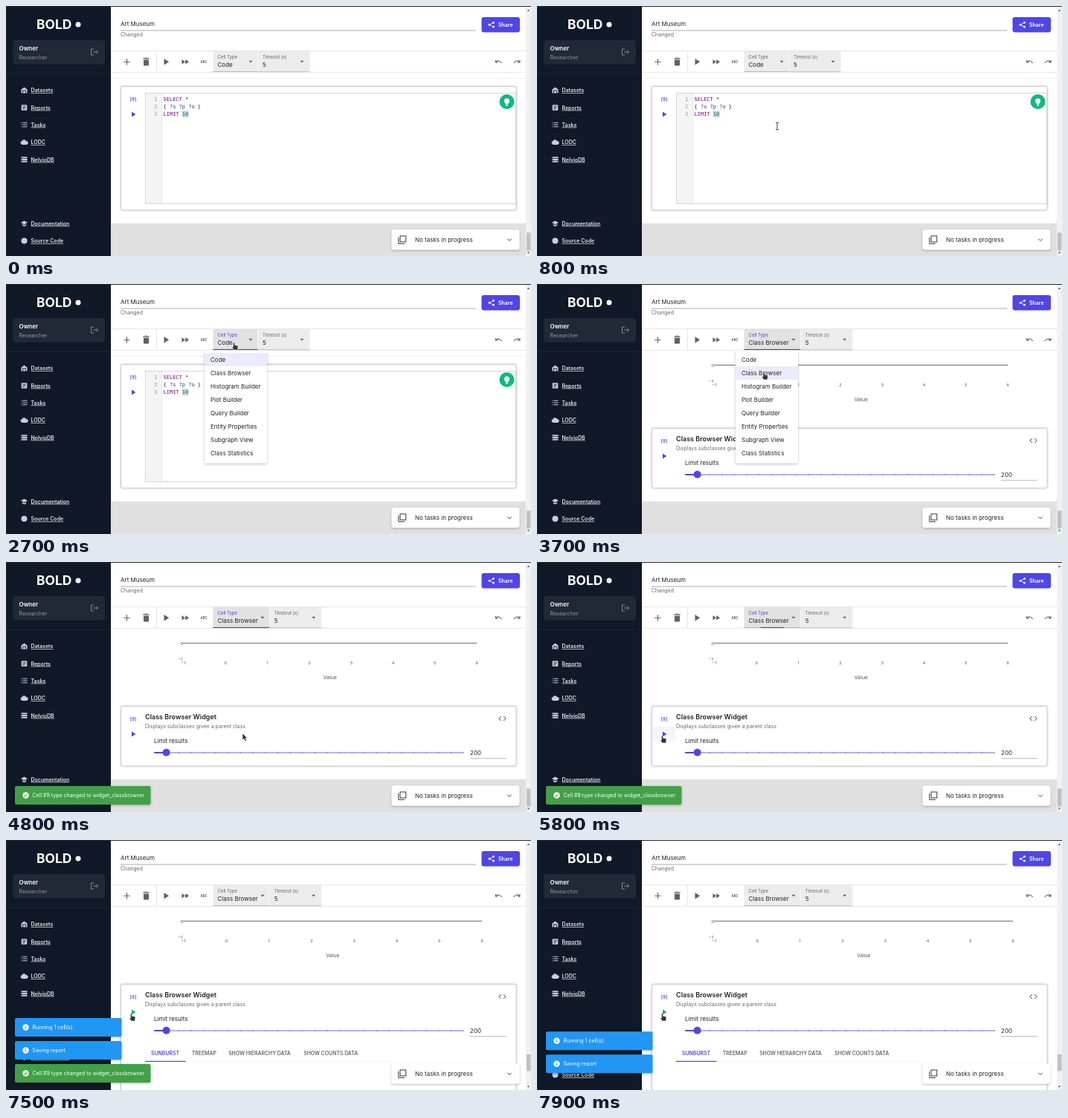
An HTML page for the animation above (8000 ms loop, 706x337 px).

```html
<!DOCTYPE html>
<html lang="en">
<head>
<meta charset="utf-8">
<title>Notebook cell type</title>
<style>
  html, body { margin: 0; width: 100%; height: 100%; overflow: hidden; background: #fff; }
  svg { display: block; width: 100vw; height: 100vh; font-family: Inter, "Open Sans", sans-serif; }
  text { white-space: pre; }
  .mono { font-family: "DejaVu Sans Mono", "Liberation Mono", monospace; }
  .plot { font-family: "Open Sans", sans-serif; }
  .nav { text-decoration: underline; text-decoration-color: #3d3dc4; text-decoration-thickness: .6px; }
</style>
</head>
<body>
<svg id="stage" viewBox="0 0 706 337">
  <defs>
    <filter id="shadow" x="-20%" y="-20%" width="140%" height="150%">
      <feDropShadow dx="0" dy="1.2" stdDeviation="1.8" flood-opacity=".28"/>
    </filter>
  </defs>
</svg>
<script>
const LOOP = 8000;
const PURPLE = '#4f46e5', GREY = '#666', INK = '#222', ICON = '#616161';
const stage = document.getElementById('stage');

// Markup helpers; y of text is the middle of its capitals.
const text = (x, y, s, size = 8, fill = INK, extra = '') =>
  `<text x="${x}" y="${y + size * 0.364}" font-size="${size}" fill="${fill}" ${extra}>${s}</text>`;
const rect = (x, y, w, h, fill, extra = '') =>
  `<rect x="${x}" y="${y}" width="${w}" height="${h}" fill="${fill}" ${extra}/>`;
const path = (d, fill, extra = '') => `<path d="${d}" fill="${fill}" ${extra}/>`;
const line = (d, stroke, width = 1, extra = '') =>
  path(d, 'none', `stroke="${stroke}" stroke-width="${width}" ${extra}`);
const dot = (x, y, r, fill) => `<circle cx="${x}" cy="${y}" r="${r}" fill="${fill}"/>`;
const group = (id, body, extra = '') => `<g id="${id}" ${extra}>${body}</g>`;
const at = (x, y, body) => `<g transform="translate(${x} ${y})">${body}</g>`;
const bold = 'font-weight="600"', middle = 'text-anchor="middle"';

function sidebar() {
  const c = '#cbd0d8';
  const bars = [-2.7, 0, 2.7];
  const icons = {
    store: path('M-4-1L0-4L4-1V4H2.3V0H-2.3V4H-4Z', c) + rect(-1.5, 1, 3, 3, c),
    report: rect(-3.8, -3.8, 7.6, 7.6, c, 'rx=".8"') + line('M-2-1.8H2M-2 0H2M-2 1.8H.6', '#111827', .8),
    list: bars.map(y => line(`M-4 ${y}H-3M-2 ${y}H4`, c, 1.1)).join(''),
    cloud: path('M-3 3A2.3 2.3 0 0 1-3-1.3A3.2 3.2 0 0 1 2.6-1A2 2 0 0 1 3 3Z', c, `stroke="${c}"`),
    rows: bars.map(y => rect(-4, y - 1, 8, 2, c) + dot(-2.8, y, .4, '#111827')).join(''),
    cap: path('M-4.5-1L0-3.5L4.5-1L0 1.5Z', c) + path('M-2.7 1L0 2.5L2.7 1V2.7L0 4.2L-2.7 2.7Z', c),
    plain: dot(0, 0, 4, c),
  };
  const items = [
    ['store', 'Datasets', 113.5], ['report', 'Reports', 137], ['list', 'Tasks', 160],
    ['cloud', 'LODC', 183.5], ['rows', 'NelvioDB', 207],
    ['cap', 'Documentation', 293], ['plain', 'Source Code', 316.5],
  ];
  return rect(0, 0, 141, 337, '#111827') +
    text(41, 25, 'BOLD', 17.4, '#fff', 'font-weight="700"') + dot(97, 25, 3.5, '#fff') +
    rect(9.5, 46, 123.5, 32.5, '#212936', 'rx="4"') +
    text(17.5, 57, 'Owner', 8, '#fff', bold) + text(17.5, 69.5, 'Researcher', 7, '#9299a5') +
    line('M118 58H114.500V66H118M117 62H123.500M121 59.500L123.500 62L121 64.500', '#8b929e', .9) +
    line('M1 91H141', '#252d3b', .7) +
    items.map(([icon, label, y]) =>
      at(24.5, y, icons[icon]) + text(33.5, y, label, 7, '#e5e7eb', bold + ' class="nav"')).join('');
}

function header() {
  return text(154, 24.5, 'Art Museum') + line('M154 33H632', '#999', .8) +
    text(154, 38.7, 'Changed', 7, GREY) +
    rect(639.5, 15, 51.5, 20.5, PURPLE, 'rx="3"') +
    line('M655.500 22.500L650 25.300L655.500 28.100', '#fff', .8) +
    dot(655.5, 22.4, 1.4, '#fff') + dot(650, 25.3, 1.4, '#fff') + dot(655.5, 28.2, 1.4, '#fff') +
    text(662, 25.3, 'Share', 7, '#fff', bold);
}

const caret = (x, y) => path(`M${x - 2.5} ${y - 1.2}h5l-2.500 2.600z`, ICON);

function toolbar() {
  const undo = line('M-4-2V1H-1M-3.800 .8Q0-3.500 4.300 2', ICON, 1.1);
  return rect(141, 60, 558, 29.5, '#fff') + line('M141 60.500H699M141 89.300H699', '#e0e0e0', .8) +
    line('M162.500 71V79.500M158.200 75.200H166.700', ICON, 1.1) +
    path('M185 72.500H192V79.500Q192 80.500 191 80.500H186Q185 80.500 185 79.500ZM184.300 70.300H187L187.600 69.600H189.400L190 70.300H192.700V71.500H184.300Z', ICON) +
    line('M202.500 61V89', '#e0e0e0', .8) +
    path('M212.500 71V79.500L219.200 75.200Z', ICON) +
    path('M236.500 72V78.600L241 75.300ZM241.300 72V78.600L246 75.300Z', ICON) +
    text(266, 75, 'ABC', 4.2, ICON, middle + ' font-weight="700"') +
    rect(278.5, 61, 60, 28, '#ececec', 'id="typeBox"') +
    text(284.5, 69, 'Cell Type', 6, GREY, 'id="typeLabel"') +
    text(284.5, 79, 'Code', 8, INK, 'id="typeValue"') +
    group('typeCaret', caret(329, 75)) +
    rect(278.5, 88, 60, .8, '#333', 'id="hoverLine"') +
    group('timeout', rect(338.5, 61, 70, 28, '#ececec') + line('M338.500 61V89', '#fff', .5) +
      text(345, 69, 'Timeout (s)', 6, GREY) + text(345, 79.5, '5') + caret(398, 75) +
      line('M338.500 88.600H408.500', '#aaa', .6)) +
    rect(0, 87.8, 1, 1.2, PURPLE, 'id="focusLine"') +
    at(662.5, 75, undo) + at(687, 75, `<g transform="scale(-1 1)">${undo}</g>`);
}

const frame = (y, h) =>
  rect(153.6, y - .5, 533.4, h + 1, '#fff', 'rx="3.5" stroke="#ececf0" stroke-width="2"') +
  rect(154.5, y + .5, 531.6, h - 1, '#fff', 'rx="3" stroke="#cbcbd2" stroke-width="1"');
const play = (y, id = '') => path(`M169 ${y - 3.6}V${y + 3.6}L174.400 ${y}Z`, PURPLE, id);

function codeCell() {
  const span = (s, fill) => `<tspan fill="${fill}">${s}</tspan>`;
  const code = [
    span('SELECT', '#770088') + ' *',
    '{ ' + span('?s ?p ?o', '#1c3f9a') + ' }',
    span('LIMIT', '#770088') + ' ' + span('10', '#116644'),
  ];
  return line('M141 97.500H699', '#eee', .8) + frame(108, 167.5) +
    text(171, 126, '[9]', 6, PURPLE, middle + ' ' + bold) + play(146) +
    rect(187.5, 117.5, 498, 149, '#fff', 'stroke="#d0d0d0" stroke-width=".9"') +
    rect(188, 118, 21.5, 148, '#f4f4f4') + line('M209.700 118V266', '#ddd', .7) +
    rect(236.7, 141, 8.8, 9.5, '#cfe0e2') +
    code.map((row, i) => text(199, 125 + i * 10.4, i + 1, 7, '#999', 'class="mono"') +
      text(211.5, 125 + i * 10.4, row, 7, '#222', 'class="mono"')).join('') +
    dot(673.5, 129, 10, '#10b981') +
    path('M671.700 131.500Q670 130.200 670 128A3.500 3.500 0 0 1 677 128Q677 130.200 675.300 131.500V132.500H671.700ZM671.900 133.300H675.100V134.500H671.900Z', '#fff');
}

function plot(step) {
  const left = 239, right = left + step * 7;
  const ticks = [-1, 0, 1, 2, 3, 4, 5, 6].map(n => text(left + (n + 1) * step, 136,
    n < 0 ? '\u22121' : n, 6, '#444', middle + ' class="plot"')).join('');
  const y = 'text-anchor="end" class="plot"';
  return line(`M238 109.300H${right}`, '#555', .9) + ticks +
    text(238, 109.5, '0', 6, '#444', y) + text(238, 131, '\u22121', 6, '#444', y) +
    text((left + right) / 2, 155, 'Value', 7, '#444', middle + ' class="plot"');
}

function widgetCell() {
  const marks = Array.from({ length: 26 }, (_, i) =>
    dot(199 + i * 16.64, 257, .7, i < 2 ? '#b7b2f4' : '#6d65e8')).join('');
  const tabs = [[214, 'SUNBURST'], [266.3, 'TREEMAP'], [341, 'SHOW HIERARCHY DATA'], [436.7, 'SHOW COUNTS DATA']];
  return group('plotBefore', plot(56.3)) + group('plotAfter', plot(57.3)) +
    group('shortFrame', frame(194, 81.5)) + group('tallFrame', frame(194, 200)) +
    rect(155.5, 222, 31, 20.5, '#f5f4fd', 'rx="3" id="playHover"') +
    text(171, 212, '[9]', 6, PURPLE, middle + ' ' + bold) + play(232, 'id="playIcon"') +
    line('M167.500 232A3.800 3.800 0 0 1 172 228.600', PURPLE, .9, 'id="spinner"') +
    text(187, 209, 'Class Browser Widget', 9, INK, bold) +
    text(187, 221, 'Displays subclasses given a parent class', 7, GREY) +
    line('M665.800 208L662.800 211L665.800 214M669.200 208L672.200 211L669.200 214', '#444', 1) +
    text(199, 240.7, 'Limit results') +
    rect(199, 256, 416.5, 2, '#b7b2f4', 'rx="1"') + rect(199, 256, 16.6, 2, PURPLE, 'rx="1"') +
    marks + dot(215.6, 256.8, 5, PURPLE) +
    text(624, 257.3, '200') + line('M624 264.800H673', '#999', .7) +
    group('results', tabs.map(([x, s], i) =>
      text(x, 287, s, 6.9, i ? GREY : PURPLE, middle + ' ' + bold)).join('') +
      line('M187 298.600H674', '#eee', .6) + rect(187, 297.8, 54.500, 1.2, PURPLE));
}

function menu() {
  const items = ['Code', 'Class Browser', 'Histogram Builder', 'Plot Builder', 'Query Builder',
    'Entity Properties', 'Subgraph View', 'Class Statistics'];
  return rect(267, 89.5, 84, 152, '#fff', 'rx="2" filter="url(#shadow)"') +
    rect(267, 93, 84, 18, '#ecebfc', 'id="menuMark"') + rect(267, 111, 84, 18, '#f4f4f4', 'id="menuHover"') +
    items.map((s, i) => text(275, 102 + i * 18, s)).join('');
}

function tasks() {
  return rect(518.5, 301.5, 172, 27, '#fff', 'rx="3" filter="url(#shadow)"') +
    group('taskIcon', rect(530, 310, 7.8, 8, 'none', `stroke="${INK}" stroke-width=".9"`) +
      line('M527.800 312V320.400H536', INK, .9)) +
    text(550, 315, '', 8, INK, 'id="taskText"') +
    line('M674.200 313.700L677 316.500L679.800 313.700', '#444', 1);
}

function toast(id, width, fill, label, sign) {
  return group(id, rect(12, 0, width, 25, fill, 'rx="2" filter="url(#shadow)"') +
    dot(26.5, 12.5, 4.2, '#fff') + line(sign, fill, 1.1) + text(35.5, 12.5, label, 7, '#fff'));
}
const CHECK = 'M24.400 12.600L26 14.200L28.800 11', INFO = 'M26.500 10V11.200M26.500 12V15';

const cursors =
  group('ibeam', line('M-2-5Q0-5 0-4Q0-5 2-5M0-4V4M-2 5Q0 5 0 4Q0 5 2 5', '#222', .9)) +
  group('arrow', path('M0 0V9L2 7.200L3.700 10.600L5.400 9.700L3.800 6.500H6.600Z', '#333', 'stroke="#fff" stroke-width=".5"')) +
  group('hand', path('M-.6 0Q.4-.8 1.100 .3L1.600 3.300L4.800 3.900Q6 4.200 5.900 5.500L5.400 10H.6L-2 6.300Q-1.600 5.200-.4 6Z', '#333', 'stroke="#fff" stroke-width=".5"'));

stage.insertAdjacentHTML('beforeend',
  rect(0, 0, 706, 337, '#fff') +
  group('floor', rect(141, 285, 558, 52, '#e0e0e0') + rect(141, 270, 558, 23, '#fff', 'rx="3"')) +
  group('codeCell', codeCell()) + group('widgetCell', widgetCell()) +
  header() + toolbar() + group('menu', menu()) + tasks() +
  rect(699, 0, 7, 337, '#f1f1f1') + path('M700.800 7H704.200L702.500 4.800Z', '#555') +
  path('M700.800 331.500H704.200L702.500 333.700Z', '#555') +
  rect(700, 305.5, 5.5, 24, '#c1c1c1', 'id="thumb"') +
  sidebar() +
  toast('running', 143.500, '#2196f3', 'Running 1 cell(s)', INFO) +
  toast('saving', 143.500, '#2196f3', 'Saving report', INFO) +
  toast('changed', 182.500, '#43a047', 'Cell #9 type changed to widget_classbrowser', CHECK) +
  rect(0, 0, 1, 337, '#1d1f24') + rect(0, 0, 706, 1, '#26282c') +
  group('cursor', cursors));

const el = {};
stage.querySelectorAll('[id]').forEach(node => el[node.id] = node);
const show = (id, on) => el[id].setAttribute('display', on ? 'inline' : 'none');
const set = (id, attrs) => Object.entries(attrs).forEach(([k, v]) => el[id].setAttribute(k, v));
const move = (id, x, y) => set(id, { transform: `translate(${x} ${y})` });

const progress = (t, start, length) => Math.min(1, Math.max(0, (t - start) / length));
const easeOut = p => 1 - (1 - p) ** 3;
const smooth = p => p * p * (3 - 2 * p);

// Time, x, y of the pointer.
const TRACK = [
  [100, 690, 318], [800, 323, 162], [1050, 323, 162], [1100, 327, 161], [1300, 325, 156],
  [1700, 306, 79], [2700, 306, 79], [2900, 304, 105], [3100, 304.5, 119], [4200, 304.5, 119],
  [4500, 309, 188], [4600, 318, 231], [4800, 318, 231], [5000, 154, 233], [5200, 154, 233],
  [5500, 163, 234], [5700, 168, 234],
];

function pointerAt(t) {
  const i = TRACK.findIndex(key => key[0] > t);
  if (i < 0) return TRACK[TRACK.length - 1].slice(1);
  if (i === 0) return TRACK[0].slice(1);
  const [t0, x0, y0] = TRACK[i - 1], [t1, x1, y1] = TRACK[i];
  const p = smooth((t - t0) / (t1 - t0));
  return [x0 + (x1 - x0) * p, y0 + (y1 - y0) * p];
}

function drawPointer(t) {
  const [x, y] = pointerAt(t);
  const editing = t < 2100 && x > 210 && x < 685 && y > 117 && y < 267;
  const hand = (t >= 1600 && t < 3800) || (t >= 5600 && t < 7000) || t >= 7400;
  show('cursor', t >= 100);
  show('ibeam', editing);
  show('hand', hand);
  show('arrow', !editing && !hand);
  move('cursor', x, y);
}

function drawSelect(t, changed) {
  const width = changed ? 75.5 : 60;
  const focused = t >= 2100 && t < 5850;
  const hover = t >= 1600 && t < 2100;
  const grow = easeOut(progress(t, 2100, 200)) * (1 - easeOut(progress(t, 5750, 200)));
  set('typeBox', { width, fill: hover || focused ? '#e2e2e2' : '#ececec' });
  set('typeLabel', { fill: focused ? PURPLE : GREY });
  el.typeValue.textContent = changed ? 'Class Browser' : 'Code';
  move('typeCaret', changed ? 16 : 0, 0);
  move('timeout', changed ? 15.7 : 0, 0);
  set('hoverLine', { width, fill: hover ? '#333' : '#aaa' });
  set('focusLine', { x: 278.5 + width * (1 - grow) / 2, width: width * grow });
}

function drawMenu(t, changed) {
  const open = easeOut(progress(t, 2100, 250));
  show('menu', t >= 2100 && t < 3950);
  set('menu', {
    opacity: open * (1 - progress(t, 3750, 200)),
    transform: `translate(0 ${89.5 * (1 - open) * .3}) scale(1 ${.7 + .3 * open})`,
  });
  set('menuMark', { y: changed ? 111 : 93 });
  show('menuHover', t >= 2950 && !changed);
}

function drawToasts(t) {
  const slide = start => -156 * (1 - easeOut(progress(t, start, 225)));
  const drop = 31 * smooth(progress(t, 7700, 360));
  const leave = -200 * progress(t, 7520, 180) ** 2;
  move('changed', slide(4050) * 1.25 + leave, 302);
  move('saving', slide(6250), 271 + drop);
  move('running', slide(7080), 240 + drop);
  show('changed', t >= 4050 && t < 7700);
  show('saving', t >= 6250);
  show('running', t >= 7080);
}

function draw(t) {
  const changed = t >= 3650, busy = t >= 7000 && t < 7400, done = t >= 7400;
  show('codeCell', !changed);
  show('widgetCell', changed);
  show('plotBefore', t < 7000);
  show('plotAfter', t >= 7000);
  show('shortFrame', !done);
  show('tallFrame', done);
  show('results', done);
  show('floor', !done);
  show('playHover', t >= 5600 && t < 7000);
  show('playIcon', !busy);
  set('playIcon', { fill: done ? '#16a59c' : PURPLE });
  show('spinner', busy);
  set('spinner', { transform: `rotate(${(t - 7100) * 0.257} 171.300 232.400)` });
  show('taskIcon', !busy);
  el.taskText.textContent = busy ? '1 tasks in progress' : 'No tasks in progress';
  set('thumb', { y: done ? 289 : 305.5, height: done ? 22.5 : 24 });
  drawSelect(t, changed);
  drawMenu(t, changed);
  drawToasts(t);
  drawPointer(t);
}

function tick() {
  draw(performance.now() % LOOP);
  requestAnimationFrame(tick);
}
tick();
</script>
</body>
</html>
```
